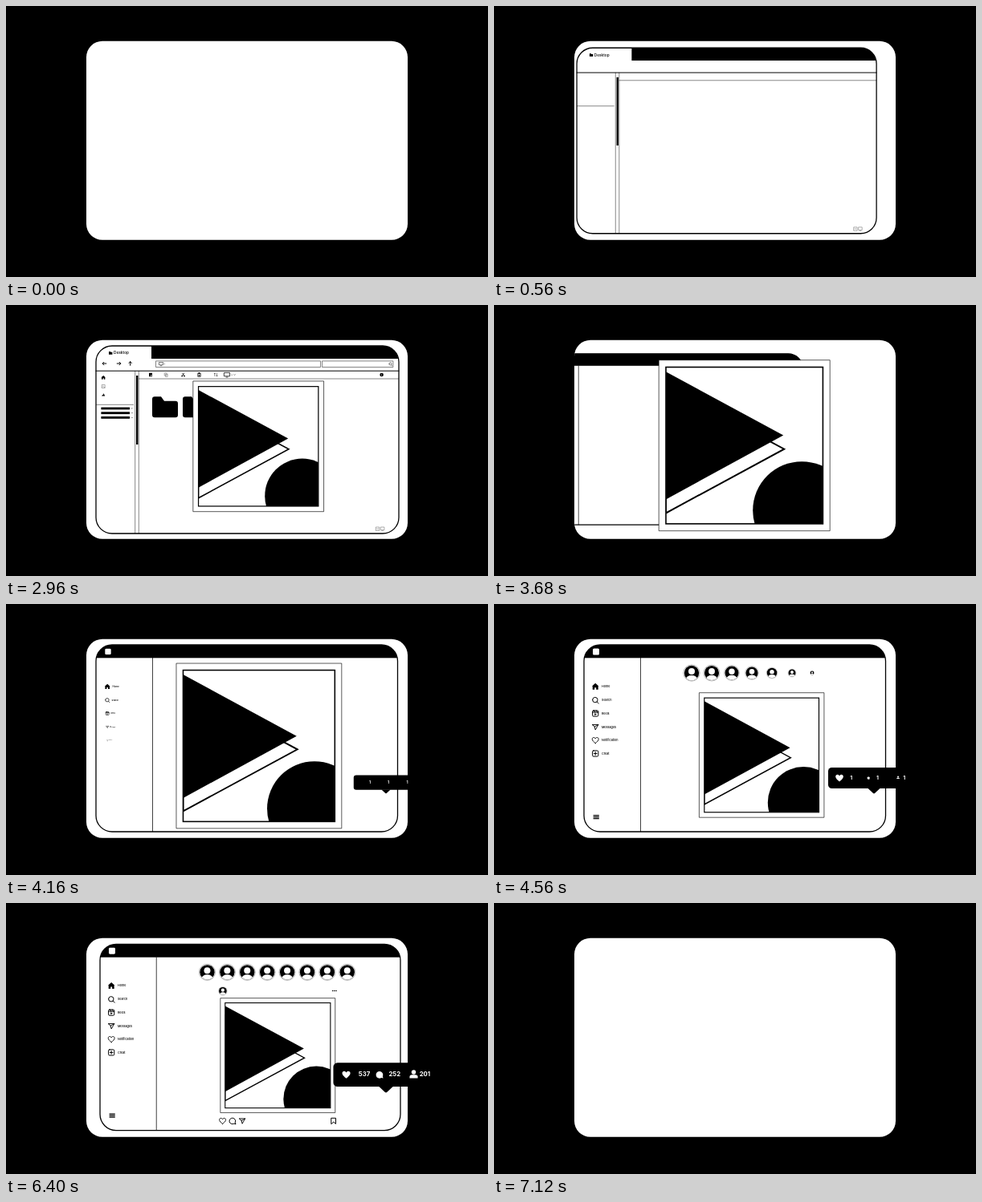
Recreate the animation shown at these times as an HTML page. Size 600 px wide and 338 px high, loop 7480 ms.

```html
<!DOCTYPE html>
<html lang="en">
<head>
<meta charset="utf-8">
<title>Desktop to feed</title>
<style>
html, body { margin: 0; width: 100%; height: 100%; overflow: hidden; background: #000; }
svg { display: block; width: 100vw; height: 100vh; }
text { font-family: Inter, "Open Sans", sans-serif; }
.line { fill: none; stroke: #000; stroke-width: 1; stroke-linejoin: round; stroke-linecap: round; }
.fine { fill: none; stroke: #000; stroke-width: .75; }
.thin { fill: none; stroke: #000; stroke-width: .48; }
.grey { fill: none; stroke: #777; stroke-width: .6; }
.white { fill: #fff; }
.count { fill: #fff; font-size: 6.8px; font-weight: 700; }
</style>
</head>
<body>
<svg viewBox="0 0 600 338">
  <defs>
    <clipPath id="cardClip"><rect x="100" y="43.8" width="400" height="248" rx="20"/></clipPath>
    <clipPath id="deskClip"><rect x="112" y="51" width="377" height="234" rx="20"/></clipPath>
    <clipPath id="feedClip"><rect x="112" y="51" width="375.5" height="233" rx="20"/></clipPath>
    <clipPath id="artClip"><rect x="-97.7" y="-97.7" width="195.4" height="195.4"/></clipPath>
    <clipPath id="faceClip"><circle r="9.2"/></clipPath>
  </defs>
  <rect width="600" height="338"/>
  <rect x="100" y="43.8" width="400" height="248" rx="20" class="white"/>
  <g clip-path="url(#cardClip)">
    <g id="desk">
      <g clip-path="url(#deskClip)">
        <rect x="112" y="51" width="377" height="234" class="white"/>
        <rect x="181" y="50" width="310" height="17"/>
      </g>
      <path class="line" d="M112 82.2H489"/>
      <path class="thin" d="M165 92H489M160.7 82V285M165.3 82V285M112 124.3H159"/>
      <rect x="162" y="88" width="2.4" height="86"/>
      <path d="M128 58h1.8l.6.8h2v3H128z"/>
      <text x="134" y="61.4" font-size="4.8" font-weight="500">Desktop</text>
      <path class="grey" d="M460.3 277h4.4v4.5h-4.4zM466.3 277h4.6v3.6h-4.6zM461.3 279.2h2.4M467.3 281.6h2.6"/>
      <rect x="112" y="51" width="377" height="234" rx="20" class="line" style="stroke-width:1.3"/>
      <g id="deskItems"></g>
    </g>
    <g id="feed">
      <g clip-path="url(#feedClip)">
        <rect x="112" y="51" width="375.5" height="233" class="white"/>
        <rect x="112" y="50" width="376" height="17.3"/>
      </g>
      <path class="fine" d="M182.5 67V284"/>
      <rect x="112" y="51" width="375.5" height="233" rx="20" class="line" style="stroke-width:1.3"/>
      <g id="feedItems"></g>
    </g>
    <g id="art">
      <rect x="-106.5" y="-106.5" width="213" height="213" fill="#fff" stroke="#000" stroke-width=".65" vector-effect="non-scaling-stroke"/>
      <g clip-path="url(#artClip)">
        <path d="M-97.7-75L49.5 4.5L-97.7 84.3z" fill="#fff" stroke="#000" stroke-width="2"/>
        <path d="M-97.7-92L48.5-12.7L-97.7 67.3z"/>
        <circle cx="71.5" cy="81" r="61"/>
      </g>
      <rect x="-97.7" y="-97.7" width="195.4" height="195.4" fill="none" stroke="#000" stroke-width="1.6"/>
    </g>
  </g>
  <g id="tip">
    <rect x="416" y="204" width="114" height="26" rx="4.5"/>
    <path d="M465 229.5H481L474 236Q473 236.8 472 236z"/>
    <g id="tipItems"></g>
    <text class="count" x="443.3" y="218.8">1</text>
    <text class="count" x="476" y="218.8">1</text>
    <text class="count" x="509.2" y="218.8">1</text>
  </g>
</svg>
<script>
const LOOP = 7480, STEP = 40;
const $ = id => document.getElementById(id);
const lerp = (a, b, k) => a + (b - a) * k;
const quadOut = k => 1 - (1 - k) ** 2;
const cubicOut = k => 1 - (1 - k) ** 3;
const cubicIn = k => k ** 3;
const sine = k => (1 - Math.cos(Math.PI * k)) / 2;
const linear = k => k;
const backOut = k => 1 + 2.7 * (k - 1) ** 3 + 1.7 * (k - 1) ** 2;
const seg = (t, a, b, ease = sine) => ease(Math.min(1, Math.max(0, (t - a) / (b - a))));

// Parts that scale up from nothing around their own centre
const pops = [];
function pop(parent, x, y, start, dur, markup, ease = quadOut) {
  const el = document.createElementNS('http://www.w3.org/2000/svg', 'g');
  el.innerHTML = markup;
  $(parent).append(el);
  pops.push({ el, x, y, start, dur, ease });
}
const path = (d, cls = 'line') => `<path class="${cls}" d="${d}"/>`;
const solid = d => path(d, '');
const scaled = (k, markup) => `<g transform="scale(${k})">${markup}</g>`;

const heart = 'M0 4C-2.2 2.2-4.4.4-4.4-1.6C-4.4-4.4-1-4.6 0-2.3C1-4.6 4.4-4.4 4.4-1.6C4.4.4 2.2 2.2 0 4z';
const bubble = 'M3.8 3.8L3.2 1.8A3.8 3.8 0 1 0 1.7 3.4z';
const plane = 'M-4-3.3H4L0 3.8L-1.1-.4zM-1.1-.4L4-3.3';
const lens = 'M2.2 2.2L4 4M-3.6-.4a3.2 3.2 0 1 0 6.4 0a3.2 3.2 0 1 0-6.4 0';
const house = 'M-4.2-.4L0-4.2L4.2-.4H3.5V3.8H1V1.2H-1V3.8H-3.5V-.4z';
const monitor = 'M-3.6-2.6H3.6V1.8H-3.6zM-1.4 3H1.4';
const box = 'M-2.3-3.6H2.3Q3.6-3.6 3.6-2.3V2.3Q3.6 3.6 2.3 3.6H-2.3Q-3.6 3.6-3.6 2.3V-2.3Q-3.6-3.6-2.3-3.6z';
const folder = 'M-16-10Q-16-13-13-13H-5L-1-7.5H13Q16-7.5 16-4.5V10Q16 13 13 13H-13Q-16 13-16 10z';
const avatar = '<circle r="10.1" fill="#fff" stroke="#666" stroke-width=".5"/><circle r="9.2"/>' +
  '<g clip-path="url(#faceClip)" class="white"><circle cy="-2" r="4"/><ellipse cy="7.8" rx="7" ry="4.9"/></g>';

// File manager: navigation row, tool row, side list, folders
const tools = [
  [122.5, 73, path('M2.3 0H-2.3M-.6-1.7L-2.3 0L-.6 1.7')],
  [140.5, 73, path('M-2.3 0H2.3M.6-1.7L2.3 0L.6 1.7')],
  [154.7, 73, path('M0 2.3V-2.3M-1.7-.6L0-2.3L1.7-.6')],
  [289, 73.7, path('M-102.5-3.8H102.5V3.8H-102.5z', 'thin') + `<g transform="translate(-96 -.2) scale(.72)">${path(monitor, 'fine')}</g>` + solid('M-92-.2h.8v.6h-.8z')],
  [437.7, 73.7, path('M-44.2-3.8H44.2V3.8H-44.2z', 'thin') + `<g transform="translate(41 0) scale(.5)">${path(lens)}</g>`],
  [180, 87, solid('M-2-2.2H2V2.2H-2z') + path('M0 .2H1.4V1.6H0z', 'white')],
  [199.2, 87, path('M-2-2.2H.8V1H-2zM-.8-.8H2V2.4H-.8z', 'grey')],
  [220.6, 87, path('M-1.3-2.3L1 1M1.3-2.3L-1 1', 'fine') + '<circle cx="-1.4" cy="1.6" r=".9"/><circle cx="1.4" cy="1.6" r=".9"/>'],
  [240.5, 87, path('M-1.7-1.8H1.7V2.3H-1.7z', 'fine') + solid('M-1-2.7H1V-1H-1zM-.8 0H.8V1.4H-.8z')],
  [261.2, 87, path('M-1.3 2V-2M-2.3-1L-1.3-2L-.4-1M1.3-2V2M.4 1L1.3 2L2.3 1', 'thin')],
  [275, 87, path(monitor, 'fine')],
  [283.3, 87, solid('M-2.6-.3h.9v.7h-.9z') + path('M.2-.5L1.3.4L2.4-.5', 'thin')],
  [467.6, 87, '<circle r="2.3"/>' + path('M-.3-1.3h.6v.6h-.6zM-.3-.3h.6v1.6h-.6z', 'white')],
  [121.2, 90.5, scaled(.62, solid(house))],
  [121.2, 101.5, path('M-2-2H2V2H-2zM-2 1L-.5-.2L2 1.4', 'grey')],
  [121.2, 112, solid('M-2.1 1.6L-1-.2L-.2.3L.2-2L2.1 1.6z')]
];
tools.forEach(([x, y, m], i) => pop('deskItems', x, y, 800 + i * 20, 400, m));
for (let i = 0; i < 3; i++) {
  const y = 129 + i * 5.7;
  pop('deskItems', 136.2, y, 1000 + i * 60, 400, '<rect x="-17.8" y="-1.4" width="35.6" height="2.8"/>');
  pop('deskItems', 157, y, 1200 + i * 60, 600, path('M-.9-.5L0 .4L.9-.5', 'thin'));
  pop('deskItems', 198 + i * 38, 127.2, 1060 + i * 60, 760, solid(folder));
}

// Feed: logo block, menu, round avatars, post controls
pop('feedItems', 127, 59.4, 3900, 360, '<rect class="white" x="-4" y="-4" width="8" height="8" rx="1.5"/>');
const menu = [
  ['Home', 103, solid(house)],
  ['Search', 120, path(lens)],
  ['Reels', 136.5, path(box + 'M-3.6-1.5H3.6M-1.4-3.6L-.4-1.5M1.2-3.6L2.2-1.5') + solid('M-1-.3L1.8 1.1L-1 2.5z')],
  ['Messages', 153.5, scaled(.92, path(plane))],
  ['Notification', 170, scaled(.9, path(heart))],
  ['Creat', 186.5, path(box + 'M-1.8 0H1.8M0-1.8V1.8')]
];
menu.forEach(([label, y, icon], i) => pop('feedItems', 126.2, y, 3960 + i * 40, 360,
  `${icon}<text x="7.8" y="1.2" font-size="3.7" font-weight="500">${label}</text>`));
pop('feedItems', 127.2, 265.6, 4200, 320, solid('M-3.6-2.7H3.6v1.3H-3.6zM-3.6-.7H3.6v1.3H-3.6zM-3.6 1.3H3.6v1.3H-3.6z'));
for (let i = 0; i < 8; i++) pop('feedItems', 246 + i * 25, 86, 3990 + i * 82, 560, avatar);
const post = [
  [265.5, 109.5, scaled(.53, avatar)],
  [405, 109.3, '<circle cx="-2.2" r=".8"/><circle r=".8"/><circle cx="2.2" r=".8"/>'],
  [265.2, 272.3, scaled(.9, path(heart))],
  [277.7, 272.3, path(bubble)],
  [289.8, 272.3, scaled(.9, path(plane))],
  [404, 272.3, path('M-2.7-3.6H2.7V3.6L0 1.2L-2.7 3.6z')]
];
post.forEach(([x, y, m], i) => pop('feedItems', x, y, 4700 + i * 40, 440, m));

// Reaction bubble
pop('tipItems', 430, 217, 4200, 600, path(heart, 'white'), backOut);
pop('tipItems', 466.2, 217, 4500, 600, path(bubble, 'white'), backOut);
pop('tipItems', 503, 216.3, 4500, 600,
  '<circle class="white" cy="-2" r="2.4"/>' + path('M-4.4 4.4V3Q-4.4.8-2 .8H2Q4.4.8 4.4 3V4.4z', 'white'), backOut);
const counters = [...document.querySelectorAll('.count')];
const totals = [128, 60, 48];

const SHIFT = 346, SMALL = .665;
// Slides in from the left, leaves to the right, smaller at both ends
function slide(t, inAt, outAt, outEnd) {
  const away = 1 - seg(t, inAt, inAt + 760, cubicOut);
  const gone = seg(t, outAt, outEnd, cubicIn);
  const s = 1 - (1 - SMALL) * (away + gone);
  return `translate(${300 + SHIFT * (gone - away)} 168) scale(${s}) translate(-300 -168)`;
}
function place(el, x, y, s) {
  el.style.display = s > .002 ? '' : 'none';
  el.setAttribute('transform', `translate(${x} ${y}) scale(${s})`);
}
function show(id, on, transform) {
  $(id).style.display = on ? '' : 'none';
  $(id).setAttribute('transform', transform);
}

function drawArt(t) {
  const open = seg(t, 2640, 3130), settle = seg(t, 2960, 3120);
  const thumb = 26 * seg(t, 1240, 2000, quadOut);
  const w = lerp(lerp(thumb, 213, open), 143.5, seg(t, 4000, 4770));
  const x = lerp(lerp(314.2, 311.7, settle), 334.2, seg(t, 4000, 4650));
  const y = lerp(lerp(128.5, 176.3, seg(t, 2640, 2960)) - 1.1 * settle, 190.2, seg(t, 4000, 4720));
  const exit = t > 6280 ? slide(t, 3400, 6280, 6800) : '';
  show('art', w > .1 && t < 6800, `${exit} translate(${x} ${y}) scale(${w / 213})`);
}

function drawTip(t) {
  const grown = seg(t, 4080, 4480, backOut) + .15 * seg(t, 5200, 6200) + .05 * seg(t, 6600, 6720);
  const s = grown * (1 - seg(t, 6720, 7110, linear));
  show('tip', s > .002, `translate(473 236) scale(${s}) translate(-473 -236)`);
  const k = Math.max(0, (Math.min(t, 6280) - 4560) / 840) ** 2;
  counters.forEach((el, i) => { el.textContent = Math.max(1, Math.round(totals[i] * k)); });
}

function draw(now) {
  const t = Math.floor((now % LOOP) / STEP) * STEP;
  show('desk', t > 40 && t < 3660, slide(t, 40, 3240, 3660));
  show('feed', t > 3400 && t < 6800, slide(t, 3400, 6280, 6800));
  for (const p of pops) place(p.el, p.x, p.y, seg(t, p.start, p.start + p.dur, p.ease));
  drawArt(t);
  drawTip(t);
}

const began = performance.now();
function tick() {
  draw(performance.now() - began);
  requestAnimationFrame(tick);
}
tick();
</script>
</body>
</html>
```
